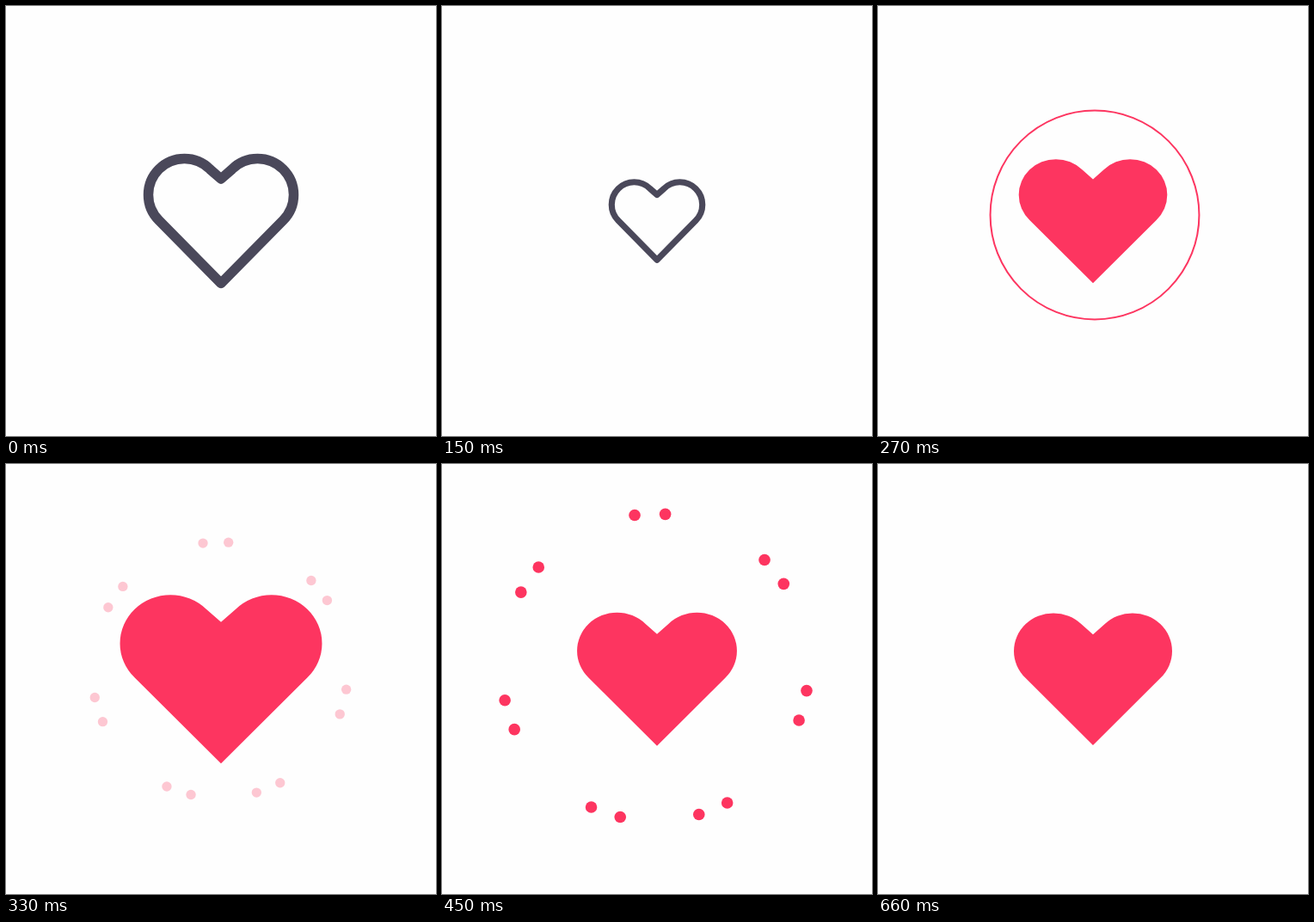
Recreate the animation shown at these times as an HTML page with a canvas. Size 500 by 500 pixels, loop 0.93 s.

```html
<!DOCTYPE html>
<html lang="en">
<head>
<meta charset="utf-8">
<title>Like</title>
<style>
  html, body { margin: 0; width: 100%; height: 100%; overflow: hidden; background: #fefefe; }
  canvas { display: block; width: 500px; height: 500px; }
</style>
</head>
<body>
<canvas id="stage"></canvas>
<script>
const LOOP = 930, STEP = 30, REST = 660;
const PINK = '#fd3560', INK = '#4a485a', PAPER = '#fefefe';
const TAU = Math.PI * 2;

const canvas = document.getElementById('stage');
const ctx = canvas.getContext('2d');
const dpr = window.devicePixelRatio || 1;
canvas.width = canvas.height = 500 * dpr;

const clamp = x => Math.min(1, Math.max(0, x));
const mix = (a, b, u) => a + (b - a) * u;
const smooth = u => u * u * (3 - 2 * u);
const speedUp = u => Math.pow(u, 2.2);

// Heart size: [time, scale, easing towards this key]
const SCALE = [
  [0, 1],
  [178, 0.452, speedUp],
  [345, 1.296, smooth],
  [530, 0.82, smooth],
  [660, 1, smooth]
];

function heartScale(t) {
  for (let i = 1; i < SCALE.length; i++) {
    const [t0, a] = SCALE[i - 1], [t1, b, ease] = SCALE[i];
    if (t <= t1) return mix(a, b, ease((t - t0) / (t1 - t0)));
  }
  return 1;
}

// Two elliptical lobes centred at (±rx, cy), joined by a notch and a tip
function heartPath(rx, ry, cx, cy, notch, tip) {
  const q = Math.PI / 4;
  ctx.beginPath();
  ctx.moveTo(0, tip);
  ctx.ellipse(-cx, cy, rx, ry, 0, 3 * q, 7 * q);
  ctx.lineTo(0, notch);
  ctx.ellipse(cx, cy, rx, ry, 0, 5 * q, 9 * q);
  ctx.closePath();
}

function drawHeart(t) {
  const s = heartScale(t);
  ctx.save();
  ctx.translate(250, 250);
  ctx.scale(s, s);
  if (t < 165) {
    heartPath(42, 42, 42.5, -30.5, -49, 72.5);
    ctx.lineWidth = 11.5;
    ctx.lineJoin = 'round';
    ctx.strokeStyle = INK;
    ctx.stroke();
  } else {
    heartPath(46, 44.2, 46, -32.4, -51.8, 77);
    ctx.fillStyle = PINK;
    ctx.fill();
  }
  ctx.restore();
}

function drawRing(t) {
  const u = (t - 150) / 150;
  if (u <= 0 || u >= 1) return;
  ctx.beginPath();
  ctx.arc(252, 243, 126.5 * (1 - (1 - u) ** 2), 0, TAU);
  ctx.lineWidth = 10 * (1 - u);
  ctx.strokeStyle = PINK;
  ctx.stroke();
}

function drawDots(t) {
  if (t <= 300 || t > 490) return;
  const s = 1.092 - 2.93e-6 * (627 - t) ** 2;
  ctx.save();
  ctx.translate(254, 255);
  ctx.scale(s, s);
  ctx.translate(-6.5, -18.5);
  ctx.globalAlpha = clamp((t - 300) / 110);
  ctx.fillStyle = PINK;
  for (let i = 0; i < 7; i++) {
    for (const side of [-1, 1]) {
      const a = (108.75 + 53.14 * i + 5.72 * side) * Math.PI / 180;
      ctx.beginPath();
      ctx.arc(178.5 * Math.cos(a), 178.5 * Math.sin(a), 6.8, 0, TAU);
      ctx.fill();
    }
  }
  ctx.restore();
}

function draw(now) {
  const t = Math.min(REST, Math.floor((now % LOOP) / STEP) * STEP);
  ctx.setTransform(dpr, 0, 0, dpr, 0, 0);
  ctx.fillStyle = PAPER;
  ctx.fillRect(0, 0, 500, 500);
  drawRing(t);
  drawDots(t);
  drawHeart(t);
}

let start = null;
function tick(now) {
  if (start === null) start = now;
  draw(Math.max(0, now - start));
  requestAnimationFrame(tick);
}
draw(0);
requestAnimationFrame(tick);
</script>
</body>
</html>
```
